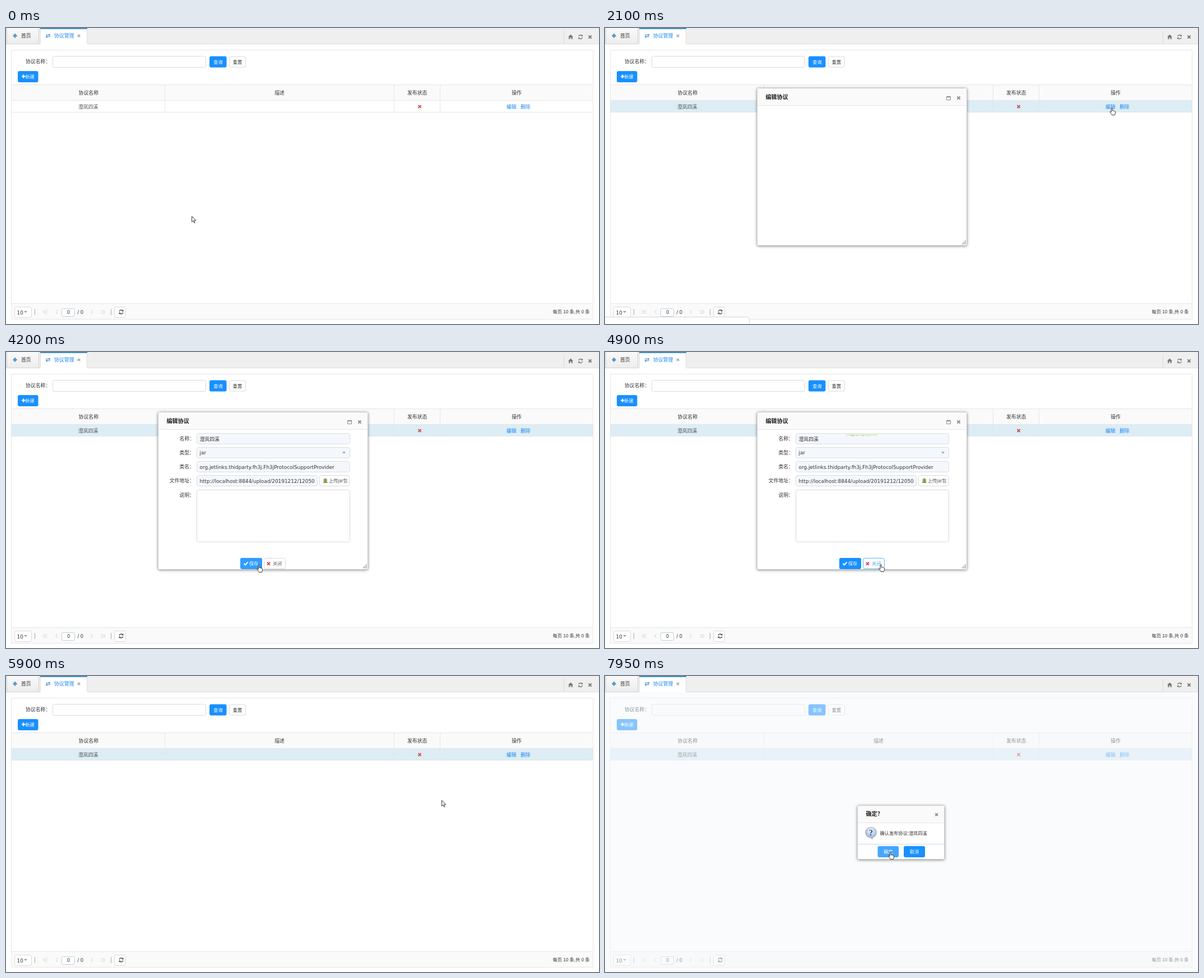
Animation, 1058 px wide and 529 px high, one loop 8 s. Source, as an HTML page:

```html
<!DOCTYPE html>
<html lang="zh">
<head>
<meta charset="utf-8">
<title>协议管理</title>
<style>
html, body { margin: 0; width: 100%; height: 100%; overflow: hidden; background: #fff; }
svg { display: block; }
#stage { position: absolute; left: 0; top: 0; }
text, #toast { font: 8.9px "DejaVu Sans", "Noto Sans CJK SC", "Noto Sans CJK", sans-serif; fill: #333; }
.s { font: 8.2px "Liberation Sans", "Noto Sans CJK SC", "Noto Sans CJK", sans-serif; }
.b { font-size: 10.1px; font-weight: bold; fill: #222; }
.m { text-anchor: middle; }
.e { text-anchor: end; }
.w { fill: #fff; }
.link { fill: #1e88f5; }
.line { stroke: #e6e6e6; fill: none; }
.box { fill: #fff; stroke: #d9d9d9; }
.in { fill: #f4f8fc; stroke: #d9dde0; }
.btn { fill: #1890ff; }
.head { fill: #fafafa; }
.x { stroke-width: 2; fill: none; }
.red { stroke: #d2504b; }
.grey { stroke: #8a8a8a; }
.off { stroke: #c6c6c6; fill: none; }
.caret { fill: #6c9fc4; }
.win { filter: drop-shadow(0 1px 2.5px rgba(0, 0, 0, .45)); }

/* One shared 8 s clock; state changes are hard cuts */
.k, #toast, #cursor { animation: 8s step-end infinite; }
#row { animation-name: row; }
#dialog { animation-name: dialog; }
#status { animation-name: status; }
#form { animation-name: form; }
#extra { animation-name: extra; }
#note { animation-name: note; }
#save { animation-name: save; }
#close { animation-name: closeBox; }
#closeText { animation-name: closeText; }
#confirm { animation-name: confirm; }
#ok { animation-name: ok; }
#arrow { animation-name: arrow; }
#hand { animation-name: hand; }
#cursor { animation-name: cursor; animation-timing-function: linear; }
#toast {
  position: absolute; left: 430px; top: 145px; width: 49px; padding-left: 7px;
  line-height: 18px; overflow: hidden; white-space: nowrap;
  background: #dff0d8; color: #5f8f55;
  animation-name: toast; animation-timing-function: linear;
}
@keyframes row { 0% { fill: #fff } 10.6% { fill: #eef5f9 } 15%, 100% { fill: #dcedf5 } }
@keyframes dialog { 0% { opacity: 0 } 17.5% { opacity: 1 } 67.5%, 100% { opacity: 0 } }
@keyframes status { 0% { opacity: 0 } 18.75% { opacity: 1 } 31.25%, 100% { opacity: 0 } }
@keyframes form { 0% { opacity: 0 } 28.75%, 100% { opacity: 1 } }
@keyframes extra { 0% { opacity: 0 } 37.5%, 100% { opacity: 1 } }
@keyframes note { 0% { transform: translateY(-51px) } 37.5%, 100% { transform: none } }
@keyframes save { 0% { fill: #1890ff } 51.25% { fill: #2f9cff } 55% { fill: #1684ea } 57.5%, 100% { fill: #1890ff } }
@keyframes closeBox { 0% { stroke: #d9d9d9 } 59.4%, 100% { stroke: #5fb3f5 } }
@keyframes closeText { 0% { fill: #666 } 59.4%, 100% { fill: #5aa6dd } }
@keyframes confirm { 0% { opacity: 0 } 86.875%, 100% { opacity: 1 } }
@keyframes ok { 0% { fill: #1890ff } 98.1%, 100% { fill: #46a6ff } }
@keyframes arrow {
  0% { opacity: 1 } 12.3% { opacity: 0 } 29.3% { opacity: 1 } 51.25% { opacity: 0 }
  67.9% { opacity: 1 } 77.4% { opacity: 0 } 91.9% { opacity: 1 } 98.1%, 100% { opacity: 0 }
}
@keyframes hand {
  0% { opacity: 0 } 12.3% { opacity: 1 } 29.3% { opacity: 0 } 51.25% { opacity: 1 }
  67.9% { opacity: 0 } 77.4% { opacity: 1 } 91.9% { opacity: 0 } 98.1%, 100% { opacity: 1 }
}
@keyframes toast {
  0%, 60.6% { height: 0 } 61.25% { height: 5px }
  63.1%, 67.49% { height: 18px } 67.5%, 100% { height: 0 }
}
@keyframes cursor {
  0%, 2.5% { transform: translate(331px, 336px); animation-timing-function: ease-in-out }
  10.6% { transform: translate(952px, 140px) }
  12.5% { transform: translate(921px, 144px) }
  15%, 28.75% { transform: translate(900px, 142px) }
  30% { transform: translate(880px, 133px); animation-timing-function: ease-out }
  35.6%, 40.6% { transform: translate(699px, 205px) }
  40.625%, 44.375% { transform: translate(700px, 205px); animation-timing-function: ease-in-out }
  52%, 57.5% { transform: translate(447px, 380px); animation-timing-function: ease-in-out }
  60.6%, 67.5% { transform: translate(488px, 379px); animation-timing-function: ease-in-out }
  73.75% { transform: translate(777px, 222px) }
  77.5% { transform: translate(743px, 144px) }
  82.5%, 91.25% { transform: translate(736px, 141px); animation-timing-function: ease-in-out }
  98.75%, 100% { transform: translate(505px, 314px) }
}
</style>
</head>
<body>
<svg id="stage" width="1058" height="529" viewBox="0 0 1058 529">
  <defs>
    <path id="x" d="M-2.6-2.6 2.6 2.6M2.6-2.6-2.6 2.6"/>
    <path id="caret" d="M-3-1.5H3L0 1.5Z"/>
    <path id="angle" d="M2-3.5-1.5 0 2 3.5"/>
    <g id="reload">
      <path d="M-3.4-.8A3.5 3.5 0 0 1 2.6-2.3M3.4.8A3.5 3.5 0 0 1-2.6 2.3" fill="none" stroke="currentColor" stroke-width="1.3"/>
      <path d="M4-4.2V-.9H.7ZM-4 4.2V.9H-.7Z" fill="currentColor"/>
    </g>
    <linearGradient id="tab" x2="0" y2="1"><stop stop-color="#f9f9f9"/><stop offset="1" stop-color="#ededed"/></linearGradient>
    <radialGradient id="bubble" cy=".3"><stop stop-color="#fff"/><stop offset="1" stop-color="#a9bdd3"/></radialGradient>
  </defs>
  <rect width="1058" height="529" fill="#fff"/>

  <!-- Tab bar -->
  <rect width="1058" height="28" fill="#efefef"/>
  <path d="M0 28.5H1058" stroke="#dcdcdc"/>
  <rect x="1.5" y="-.5" width="57" height="29" fill="url(#tab)" stroke="#d2d2d2"/>
  <path d="M16 9.5 20 14 16 18 12 14Z" fill="#5b9bc9"/>
  <text x="27" y="17">首页</text>
  <rect x="61" width="84" height="29" fill="#fff"/>
  <path d="M61.5 0V28M144.5 0V28" stroke="#e0e0e0"/>
  <rect x="61" width="84" height="2" fill="#4590bd"/>
  <path d="M71 12.5H77M73 15.5H79" stroke="#3c8dd0" stroke-width="1.2"/>
  <path d="M76.5 10 79.5 12.5 76.5 14.5ZM73.5 13.5 70.5 15.5 73.5 18Z" fill="#3c8dd0"/>
  <text class="link" x="86" y="17">协议管理</text>
  <use href="#x" class="x" stroke="#aaa" transform="translate(130 14) scale(.85)"/>
  <path d="M995.5 5V28" stroke="#d8d8d8"/>
  <path d="M1007.5 11.5 1012 16H1010.8V20H1008.6V17H1006.4V20H1004.2V16H1003Z" fill="#777"/>
  <use href="#reload" x="1025" y="16" color="#777"/>
  <use href="#x" class="x" stroke="#777" x="1042" y="16"/>

  <!-- Search area -->
  <rect x="9.5" y="39.5" width="1038" height="481" fill="#fff" class="line"/>
  <text x="35" y="63">协议名称：</text>
  <rect class="box" x="83.5" y="50.5" width="273" height="20" rx="3"/>
  <rect class="btn" x="363" y="50.5" width="30.5" height="20" rx="3"/>
  <text class="s w m" x="378.5" y="63.5">查询</text>
  <rect class="box" x="398.5" y="51" width="29" height="19" rx="3"/>
  <text class="s m" x="413" y="63.5">重置</text>
  <rect class="btn" x="21" y="77" width="36.5" height="20" rx="3"/>
  <path d="M28 86.5H34.5M31.25 83.2V89.8" stroke="#fff" stroke-width="2"/>
  <text class="s w" x="34.5" y="89.5">新建</text>

  <!-- Table -->
  <rect class="head" x="10" y="102" width="1037" height="28"/>
  <rect id="row" class="k" x="10" y="130" width="1037.5" height="21"/>
  <path class="line" d="M10 101.5H1047M10 129.5H1047M10 150.5H1047M283.5 102V151M692.5 102V151M774.5 102V151M1047.5 102V151"/>
  <text class="m" x="147.3" y="119.3">协议名称</text>
  <text class="m" x="488" y="119.3">描述</text>
  <text class="m" x="733.7" y="119.3">发布状态</text>
  <text class="m" x="911" y="119.3">操作</text>
  <text class="m" x="146.7" y="143.8" style="fill:#555">澄岚四溪</text>
  <use href="#x" class="x red" x="738" y="140.5"/>
  <text class="link" x="893" y="143.8">编辑</text>
  <text class="link" x="918" y="143.8">删除</text>

  <!-- Pager -->
  <rect class="head" x="10" y="493" width="1037" height="27"/>
  <path class="line" d="M10 492.5H1047"/>
  <rect class="box" x="15.5" y="498.5" width="30" height="19" rx="3"/>
  <text x="19.5" y="511.5">10</text>
  <use href="#caret" class="caret" x="35" y="507.5"/>
  <path d="M51.5 502V513M187.5 502V513" stroke="#aaa"/>
  <g class="off">
    <use href="#angle" x="67.5" y="507.5"/><use href="#angle" x="71.5" y="507.5"/>
    <use href="#angle" x="90" y="507.5"/>
    <use href="#angle" transform="translate(153 507.5) scale(-1 1)"/>
    <use href="#angle" transform="translate(171.5 507.5) scale(-1 1)"/>
    <use href="#angle" transform="translate(175.5 507.5) scale(-1 1)"/>
  </g>
  <rect x="99.5" y="501.5" width="23" height="14" rx="2" fill="#fff" stroke="#b9d0e0"/>
  <text class="m" x="111.5" y="511" style="font-size:8.2px">0</text>
  <text x="127.5" y="511" style="font-size:8.2px">/ 0</text>
  <rect class="box" x="193.5" y="498.5" width="20" height="19" rx="3"/>
  <use href="#reload" x="205.5" y="507.5" color="#444"/>
  <text class="s e" x="1041.5" y="510">每页 10 条,共 0 条</text>

  <path id="status" class="k" d="M-1 516.5H254Q257.5 516.5 257.5 520V530H-1Z" fill="#fff" stroke="#d4d4d4"/>

  <!-- Edit dialog -->
  <g id="dialog" class="k">
    <rect class="win" x="271.5" y="107.5" width="374" height="281" rx="2" fill="#fff" stroke="#ccc"/>
    <rect class="head" x="272" y="108" width="373" height="30"/>
    <path class="line" d="M272 138.5H645"/>
    <text class="b" x="286.5" y="126.5">编辑协议</text>
    <path d="M609.5 122.5H616.5V128.5H609.5ZM609 123.5H617" fill="none" stroke="#8a8a8a"/>
    <use href="#x" class="x grey" x="631" y="125"/>
    <path d="M642 380.5H643.5M639.5 383H641M642 383H643.5M637 385.5H638.5M639.5 385.5H641M642 385.5H643.5" stroke="#777" stroke-width="1.3"/>
    <g id="form" class="k">
      <text class="e" x="336" y="157.5">名称：</text>
      <rect class="in" x="340.5" y="145.5" width="273" height="19" rx="3"/>
      <text class="e" x="336" y="182.5">类型：</text>
      <rect class="in" x="340.5" y="170.5" width="273" height="19" rx="3"/>
      <use href="#caret" class="caret" x="603" y="180"/>
      <g id="note" class="k">
        <text class="e" x="336" y="258.7">说明：</text>
        <rect class="box" x="340.5" y="246.5" width="273" height="93" rx="3"/>
      </g>
      <g id="extra" class="k">
        <text x="345.5" y="159">澄岚四溪</text>
        <text x="345.5" y="183.2">jar</text>
        <text class="e" x="336" y="207.7">类名：</text>
        <rect class="in" x="340.5" y="195.5" width="273" height="19" rx="3"/>
        <text x="345.5" y="208.5">org.jetlinks.thidparty.fh3j.Fh3jProtocolSupportProvider</text>
        <text class="e" x="336" y="232.7">文件地址：</text>
        <rect class="in" x="340.5" y="220.5" width="215" height="19" rx="3"/>
        <svg x="345" y="220" width="206" height="20"><text x=".5" y="13.5">http://localhost:8844/upload/20191212/12050</text></svg>
        <rect class="box" x="559.5" y="220.5" width="53" height="19" rx="3"/>
        <path d="M569.7 225 574 229.5H572V231.5H573.5V234H566V231.5H567.5V229.5H565.5Z" fill="#7da04e"/>
        <text class="s" x="575.7" y="232.8" style="fill:#555">上传jar包</text>
      </g>
      <rect id="save" class="btn k" x="418" y="368" width="39" height="20" rx="3"/>
      <path d="M424.5 378 427 380.5 431.5 375.5" fill="none" stroke="#fff" stroke-width="2"/>
      <text class="s w" x="434" y="381">保存</text>
      <rect id="close" class="box k" x="460.5" y="368.5" width="38" height="19" rx="3"/>
      <use href="#x" class="x red" x="468.5" y="378.3"/>
      <text id="closeText" class="s k" x="476" y="381">关闭</text>
    </g>
  </g>

  <!-- Confirmation -->
  <g id="confirm" class="k">
    <rect y="29" width="1058" height="500" fill="#f3f7fb" opacity=".5"/>
    <rect class="win" x="450.5" y="231.5" width="155" height="96" rx="2" fill="#fff" stroke="#ccc"/>
    <rect class="head" x="451" y="232" width="154" height="30"/>
    <path class="line" d="M451 262.5H605"/>
    <text class="b" x="465.5" y="250">确定？</text>
    <use href="#x" class="x grey" transform="translate(591.5 247.8) scale(.9)"/>
    <path d="M474.5 270.5C481 270.5 484.3 274.5 484.3 279.5S481 288.3 477.5 288.5L477 291.5 473 288.7C468 288.5 464.7 284.5 464.7 279.5S468 270.5 474.5 270.5Z" fill="url(#bubble)" stroke="#93a5b8" stroke-width=".8"/>
    <text class="m" x="474.5" y="284.5" style="font:bold 14px 'Liberation Serif',serif;fill:#17379b">?</text>
    <text class="s" x="490.5" y="284">确认发布协议:澄岚四溪</text>
    <path d="M451 300.5H605" stroke="#c3dcec"/>
    <rect id="ok" class="btn k" x="486.5" y="304" width="37.5" height="20" rx="3"/>
    <text class="s w m" x="505.3" y="317">确定</text>
    <rect class="btn" x="533" y="304" width="38" height="20" rx="3"/>
    <text class="s w m" x="552" y="317">取消</text>
  </g>

  <g id="cursor" fill="#fff" stroke="#222" stroke-width=".9" stroke-linejoin="round">
    <path id="arrow" class="k" d="M.6.6V10.6L2.9 8.5 4.6 12.3 6.2 11.6 4.6 7.9H7.8Z"/>
    <path id="hand" class="k" d="M3.2 8.5V1.7C3.2.2 5.2.2 5.2 1.7V6C5.5 5.2 7 5.3 7.1 6.3 7.5 5.6 8.8 5.8 8.9 6.8 9.4 6.3 10.5 6.6 10.5 7.6V10C10.5 11.5 9.7 12 9.5 13.5H4.3C4 12 2 10.5 1 8.6.2 7.3 1.6 6.6 2.3 7.6Z"/>
  </g>
</svg>
<div id="toast">保存成功</div>
</body>
</html>
```
